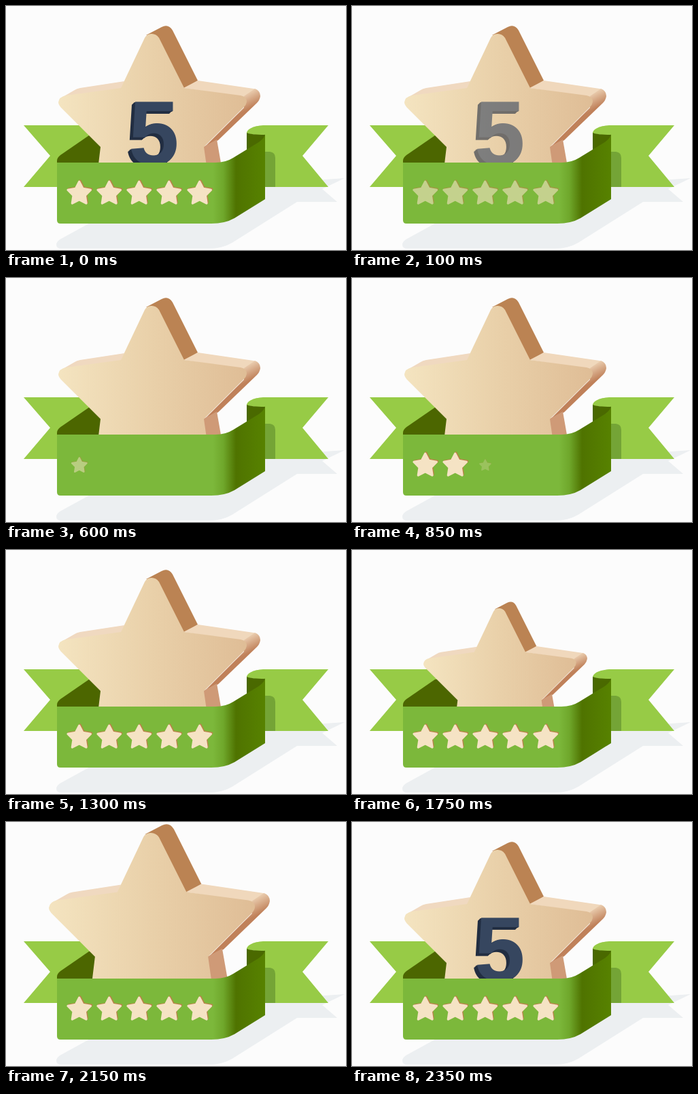
An HTML page for the animation above (5 s loop, 500 px wide and 360 px high).

```html
<!DOCTYPE html>
<html lang="en">
<head>
<meta charset="utf-8">
<title>Five star award</title>
<style>
  html, body { margin: 0; width: 100%; height: 100%; overflow: hidden; background: #fcfcfc; }
  svg { display: block; width: 100%; height: 100%; }
  text { font: bold 134px "Liberation Sans", Arial, sans-serif; }
</style>
</head>
<body>
<svg viewBox="0 0 500 360">
  <defs>
    <linearGradient id="face" gradientUnits="userSpaceOnUse" x1="77" y1="0" x2="354" y2="0">
      <stop offset="0" stop-color="#f4e4c0"/>
      <stop offset=".5" stop-color="#e9d0a9"/>
      <stop offset="1" stop-color="#dfbd96"/>
    </linearGradient>
    <linearGradient id="arm" gradientUnits="userSpaceOnUse" x1="352" y1="126" x2="364" y2="148">
      <stop offset="0" stop-color="#f0d8bb"/>
      <stop offset="1" stop-color="#c0815a"/>
    </linearGradient>
    <linearGradient id="band" gradientUnits="userSpaceOnUse" x1="75" y1="0" x2="381" y2="0">
      <stop offset="0" stop-color="#7cb83b"/>
      <stop offset=".75" stop-color="#7cb83b"/>
      <stop offset=".8" stop-color="#6fa72b"/>
      <stop offset=".86" stop-color="#4f7300"/>
      <stop offset="1" stop-color="#578200"/>
    </linearGradient>
  </defs>

  <!-- ground shadow -->
  <path fill="#eceff1" d="M140 311L80 344Q74 348 74 352Q74 358 82 358H298Q318 358 333 349L428 289H487L465 270L498 254L380 262Z"/>

  <!-- ribbon tails -->
  <path fill="#97cb46" d="M26 176H135V267H26L65 221Z"/>
  <path fill="#4c6600" d="M75 231V228Q75 224 80 220L122 191L160 188V231Z"/>
  <path fill="#97cb46" d="M354 188C354 181 366 176 381 176H474L436 221L474 267H380V192Z"/>
  <path fill="#74a436" d="M380 215H388Q396 216 396 224V267H380Z"/>
  <path fill="#4a6900" d="M354 187Q360 190 381 190V205L354 212Z"/>

  <g id="star">
    <path fill="#bb8353" d="M206 43L229 31Q239 26 245 36L282 110L262 122L222 44Z"/>
    <path fill="#f0d9c0" d="M82 135L101 124Q104 122 109 121L174 111L169 123L90 135Z"/>
    <path fill="#f0d8bc" d="M261 121L282 110L364 122Q370 123 373 128L352 140L342 133Z"/>
    <path fill="url(#arm)" d="M350 133L366 122Q374 125 374 133Q373 139 369 143L312 198L291 209L350 150Z"/>
    <path fill="#cf9a77" d="M290 208L310 197L328 300H304Z"/>
    <path fill="url(#face)" d="M204 47Q207 41 214 41Q221 41 225 47L262 121L345 132Q354 134 354 140Q354 145 350 149L291 208L304 300H128L139 208L82 151Q77 146 77 142Q78 134 88 132L169 121Z"/>
    <g id="digit"></g>
  </g>

  <path fill="url(#band)" d="M75 231H308Q323 231 334 224L365 205Q380 197 381 189V285L336 313Q322 321 302 321H80Q75 321 75 316Z"/>
  <g id="rating"></g>
</svg>

<script>
const LOOP = 5000, STEP = 50;
const NS = "http://www.w3.org/2000/svg";
const $ = id => document.getElementById(id);

function add(parent, tag, attrs, text) {
  const el = document.createElementNS(NS, tag);
  for (const k in attrs) el.setAttribute(k, attrs[k]);
  if (text) el.textContent = text;
  return parent.appendChild(el);
}

// extruded digit: dark layers first, the front last
for (let d = 5; d >= 0; d--) {
  add($("digit"), "text", { x: 180 - d, y: 234 + d * 0.7, fill: d ? "#222e42" : "#36465f" }, "5");
}

function starPath(outer, inner) {
  let d = "";
  for (let i = 0; i < 10; i++) {
    const r = i % 2 ? inner : outer, a = i * Math.PI / 5;
    d += (i ? "L" : "M") + (r * Math.sin(a)).toFixed(2) + " " + (-r * Math.cos(a)).toFixed(2);
  }
  return d + "Z";
}

const shape = starPath(17.5, 9);
const centers = [108, 152, 196, 240, 285];
const stars = centers.map(() => {
  const g = add($("rating"), "g", {});
  const layer = (color, transform) => add(g, "path", {
    d: shape, fill: color, stroke: color, "stroke-width": 3.4, "stroke-linejoin": "round", transform
  });
  layer("#b98348", "translate(.9 -.9)");
  layer("#f5e3c4", "translate(-.3 .3)");
  return g;
});

// time, scale, vertical shift
const poses = [[0, 1, 0], [1600, 1, 0], [1750, 0.811, 0], [2150, 1.094, -2.6], [2350, 1, 0], [LOOP, 1, 0]];

const ramp = (t, start, length) => Math.min(1, Math.max(0, (t - start) / length));
const ease = p => (1 - Math.cos(Math.PI * p)) / 2;

function poseAt(t) {
  const i = poses.findIndex(p => t < p[0]);
  const a = poses[i - 1], b = poses[i];
  const p = ease((t - a[0]) / (b[0] - a[0]));
  return [a[1] + (b[1] - a[1]) * p, a[2] + (b[2] - a[2]) * p];
}

function draw(t) {
  const fade = 1 - ramp(t, 0, 250);
  const [scale, shift] = poseAt(t);
  $("star").setAttribute("transform",
    `translate(225.5 ${279 + shift}) scale(${scale}) translate(-225.5 -279)`);
  $("digit").setAttribute("opacity", Math.max(fade, ramp(t, 2150, 200)));
  stars.forEach((g, i) => {
    const p = ramp(t, 500 + 150 * i, 200);
    const size = t < 500 ? 1 : 0.3 + 0.7 * p;
    g.setAttribute("opacity", Math.max(fade, p));
    g.setAttribute("transform", `translate(${centers[i]} 276.5) scale(${size})`);
  });
}

const begin = performance.now();
function tick() {
  const t = (performance.now() - begin) % LOOP;
  draw(Math.floor(t / STEP) * STEP);
  requestAnimationFrame(tick);
}
draw(0);
requestAnimationFrame(tick);
</script>
</body>
</html>
```
